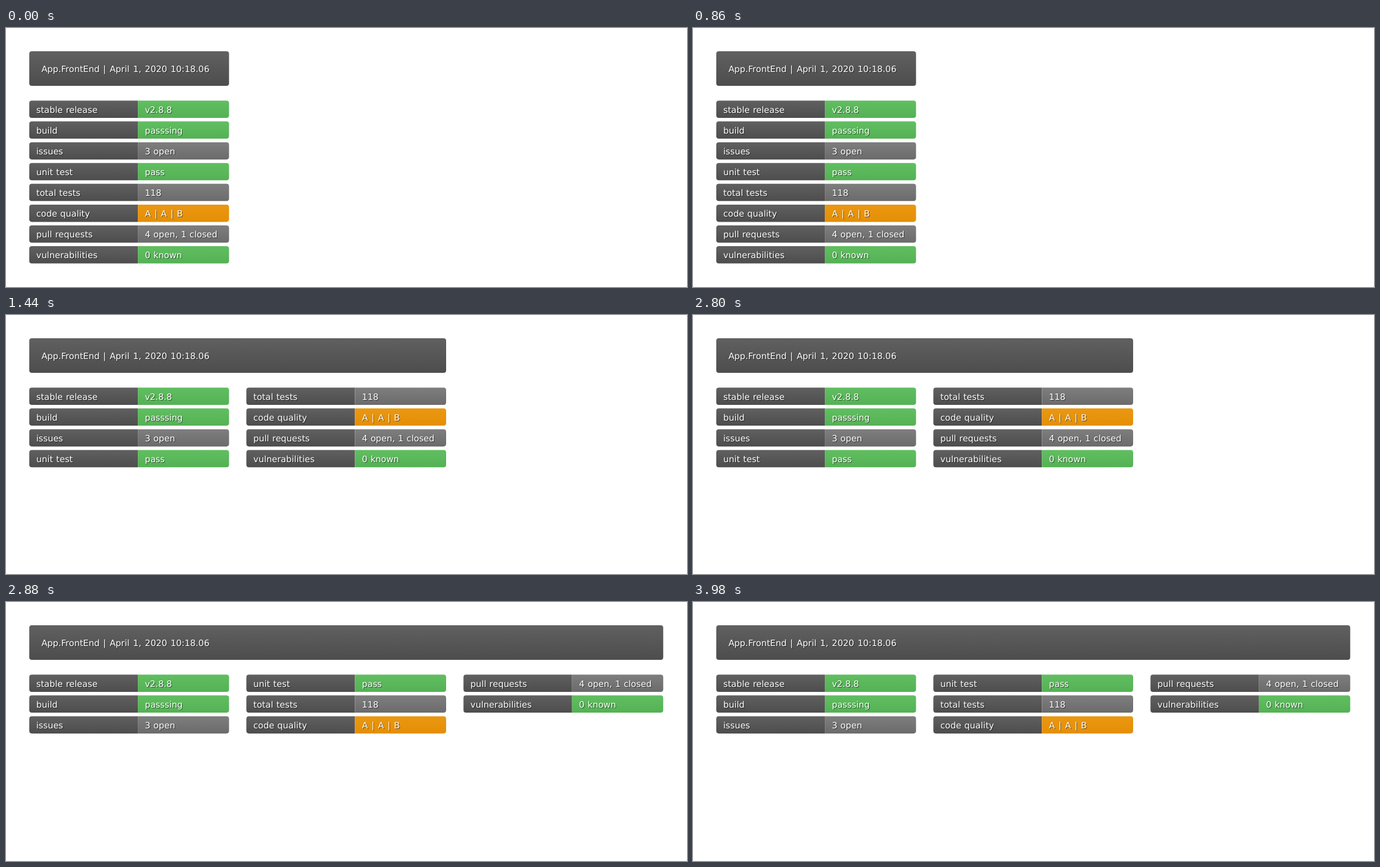
Animation of 1080 by 412 pixels, one loop 4.72 s. Source, as an HTML page:

```html
<!DOCTYPE html>
<html lang="en">
<head>
<meta charset="utf-8">
<title>Status badges</title>
<style>
  html, body { margin: 0; width: 100%; height: 100%; overflow: hidden; background: #fff; }
  svg { display: block; }
  text {
    font: 13.77px "DejaVu Sans", Verdana, sans-serif;
    word-spacing: .5px; fill: #fff;
    text-rendering: geometricPrecision;
    filter: drop-shadow(1px 1.2px .4px rgba(1, 1, 1, .5));
  }
  .wide { word-spacing: 1.3px; }
</style>
</head>
<body>
<svg id="stage" width="1080" height="412" viewBox="0 0 1080 412"></svg>
<script>
const SHADES = {
  dark: ["#606060", "#4d4d4d"],
  grey: ["#7e7e7e", "#6b6b6b"],
  green: ["#60be60", "#55b155"],
  orange: ["#ea9712", "#e48f05"],
};
const BADGES = [
  ["stable release", "v2.8.8", "green"],
  ["build", "passsing", "green"],
  ["issues", "3 open", "grey"],
  ["unit test", "pass", "green"],
  ["total tests", "118", "grey"],
  ["code quality", "A | A | B", "orange"],
  ["pull requests", "4 open, 1 closed", "grey"],
  ["vulnerabilities", "0 known", "green"],
];
const LOOP = 4720;
const STEPS = [
  { at: 0, columns: 1, rows: 8 },
  { at: 1440, columns: 2, rows: 4 },
  { at: 2880, columns: 3, rows: 3 },
];
const LEFT = 36.9, TOP = 115.5, COLUMN = 344.3, ROW = 33.08;
const WIDTH = 316.8, HEIGHT = 27.5, SPLIT = 172.2, RADIUS = 4.1;

const stage = document.getElementById("stage");

function add(parent, tag, attributes, text = "") {
  const node = document.createElementNS("http://www.w3.org/2000/svg", tag);
  for (const [key, value] of Object.entries(attributes)) node.setAttribute(key, value);
  node.textContent = text;
  parent.append(node);
  return node;
}

function write(parent, x, y, text) {
  add(parent, "text", { x, y, class: text.includes("|") ? "wide" : "" }, text);
}

for (const [id, colors] of Object.entries(SHADES)) {
  const gradient = add(stage, "linearGradient", { id, x2: 0, y2: 1 });
  colors.forEach((color, offset) => add(gradient, "stop", { offset, "stop-color": color }));
}

const header = add(stage, "rect", { x: LEFT, y: 37, height: 55, rx: RADIUS, fill: "url(#dark)" });
write(stage, LEFT + 19.3, 70.2, "App.FrontEnd | April 1, 2020 10:18.06");

// The value side is square on the left and rounded on the right.
const side = WIDTH - SPLIT - RADIUS, drop = HEIGHT - 2 * RADIUS;
const valueShape = `M${SPLIT} 0h${side}a${RADIUS} ${RADIUS} 0 0 1 ${RADIUS} ${RADIUS}v${drop}` +
  `a${RADIUS} ${RADIUS} 0 0 1 ${-RADIUS} ${RADIUS}h${-side}z`;
const labelShape = `M${SPLIT} 0H${RADIUS}a${RADIUS} ${RADIUS} 0 0 0 ${-RADIUS} ${RADIUS}v${drop}` +
  `a${RADIUS} ${RADIUS} 0 0 0 ${RADIUS} ${RADIUS}H${SPLIT}z`;

const badges = BADGES.map(([label, value, shade]) => {
  const badge = add(stage, "g", {});
  add(badge, "path", { d: labelShape, fill: "url(#dark)" });
  add(badge, "path", { d: valueShape, fill: `url(#${shade})` });
  write(badge, 11.1, 19.2, label);
  write(badge, SPLIT + 11.1, 19.2, value);
  return badge;
});

function arrange({ columns, rows }) {
  header.setAttribute("width", WIDTH + (columns - 1) * COLUMN);
  badges.forEach((badge, i) => {
    const x = LEFT + Math.floor(i / rows) * COLUMN;
    const y = TOP + (i % rows) * ROW;
    badge.setAttribute("transform", `translate(${x} ${y})`);
  });
}

const start = performance.now();
let current;
function draw() {
  const time = (performance.now() - start) % LOOP;
  const step = STEPS.findLast(s => s.at <= time);
  if (step !== current) arrange(current = step);
  requestAnimationFrame(draw);
}
draw();
</script>
</body>
</html>
```
